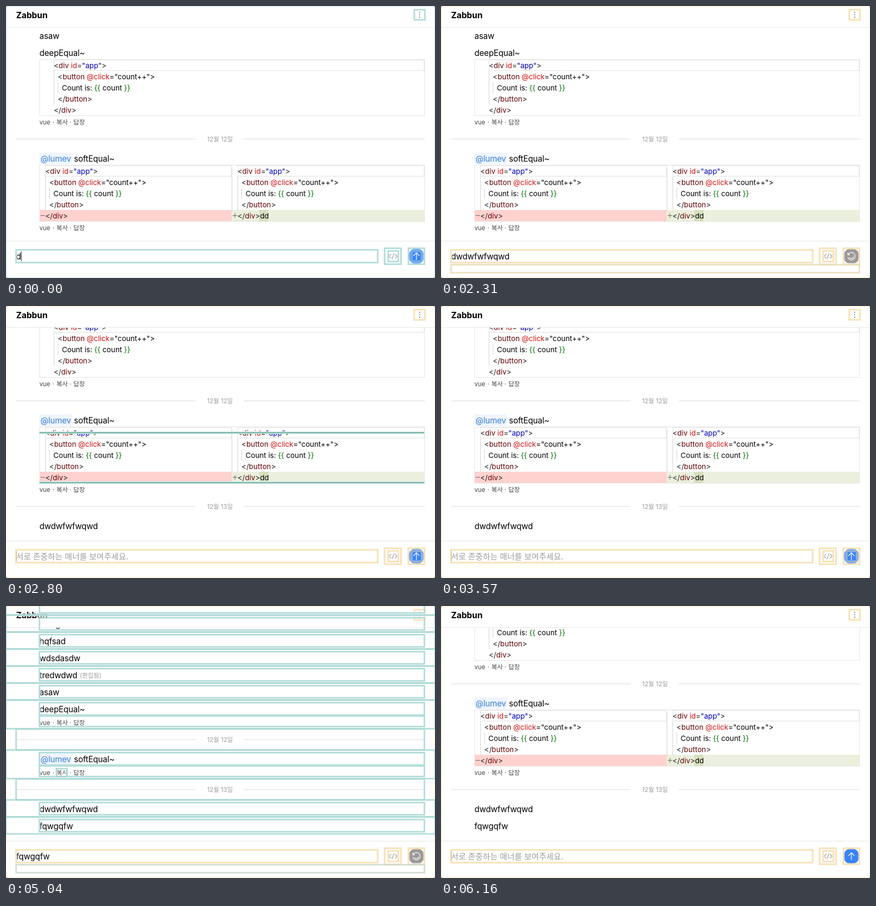
An HTML page for the animation above (6510 ms loop, 808 px wide and 512 px high).

```html
<!DOCTYPE html>
<html lang="ko">
<head>
<meta charset="utf-8">
<title>Chat</title>
<style>
html, body { margin: 0; width: 100%; height: 100%; overflow: hidden; background: #666; }
svg { display: block; width: 808px; height: 512px; }
text {
  font-family: Inter, "Noto Sans CJK KR", "Noto Sans CJK", sans-serif;
  font-feature-settings: "calt" 0;
  white-space: pre;
}
.body { font-size: 15.4px; letter-spacing: -.15px; }
.code { font-size: 13.7px; }
.small { font-size: 11.7px; }
.hint { font-size: 15.1px; }
.title { font-size: 15.8px; font-weight: 700; }
</style>
</head>
<body>
<svg id="stage" viewBox="0 0 808 512"></svg>
<script>
const LOOP = 6510;
const HEAT = ['#37afa9', '#63b19e', '#80b393', '#97b488', '#abb67d',
  '#beb771', '#cfb965', '#dfba57', '#efbb49', '#febc38'];
const INK = '#000', MUTED = '#9c9c9c', LINE = '#e5e5e5';
const PUNC = '#222', TAG = '#640000', ATTR = '#d01010', VAL = '#0000b0', MUST = '#006e00';

const stage = document.getElementById('stage');

function el(parent, name, attrs = {}) {
  const node = document.createElementNS('http://www.w3.org/2000/svg', name);
  for (const k in attrs) node.setAttribute(k, attrs[k]);
  parent.appendChild(node);
  return node;
}
const group = (parent, attrs) => el(parent, 'g', attrs);
const rect = (parent, x, y, width, height, attrs) =>
  el(parent, 'rect', { x, y, width, height, ...attrs });
const path = (parent, d, stroke, width = 1) =>
  el(parent, 'path', { d, stroke, 'stroke-width': width, fill: 'none' });
const show = (node, on) => node.setAttribute('visibility', on ? 'visible' : 'hidden');

// parts: a string, or [text, colour] pairs
function label(parent, x, y, parts, cls = 'body', fill = INK, attrs = {}) {
  const node = el(parent, 'text', { x, y, class: cls, fill, ...attrs });
  if (typeof parts === 'string') node.textContent = parts;
  else for (const [s, c] of parts) el(node, 'tspan', { fill: c }).textContent = s;
  return node;
}

// Outline with a pale halo; its colour is inherited from the group's stroke
function outline(parent, x, y, w, h) {
  const box = [x + 1, y + 1, w - 2, h - 2];
  rect(parent, ...box, { fill: 'none', stroke: '#f2f4f4', 'stroke-width': 4.5, 'stroke-opacity': .7 });
  rect(parent, ...box, { fill: 'none', 'stroke-width': 2.4, 'stroke-opacity': .4 });
}

// ---- code blocks ----
const CODE = [
  [0, [['<', PUNC], ['div', TAG], [' id', ATTR], ['=', PUNC], ['"app"', VAL], ['>', PUNC]]],
  [1, [['<', PUNC], ['button', TAG], [' @click', ATTR], ['="count++">', INK]]],
  [2, [['Count is: ', INK], ['{{', MUST], [' count ', INK], ['}}', MUST]]],
  [1, [['</', PUNC], ['button', TAG], ['>', PUNC]]],
  [0, [['</', PUNC], ['div', TAG], ['>', PUNC]]]
];

function codeLines(g, x, right, top, tail = '') {
  rect(g, x + .5, top + 1.5, right - x - 1, 20, { fill: 'none', stroke: '#e8e8e8', 'stroke-width': 1.5 });
  path(g, `M${x + .5} ${top + 22}v63M${x + 8} ${top + 43}v21`, '#d3d3d3');
  CODE.forEach(([depth, parts], i) => {
    const extra = tail && i === 4 ? [[tail, INK]] : [];
    label(g, x + depth * 7.6, top + 16.6 + i * 21, parts.concat(extra), 'code');
  });
}

const frame = (g, top) =>
  rect(g, 63.5, top + .5, 725, 106, { fill: 'none', stroke: LINE });

function singleEditor(g, top) {
  frame(g, top);
  codeLines(g, 90, 788, top);
}

function diffEditor(g, top) {
  frame(g, top);
  rect(g, 63, top + 85, 362.5, 21, { fill: '#ffd2d0' });
  rect(g, 425.5, top + 85, 363, 21, { fill: '#ebefdd' });
  rect(g, 477, top + 85, 17, 21, { fill: '#d7dfbd' });
  path(g, `M425.5 ${top + 5}v80`, '#dedede', 1.5);
  codeLines(g, 74, 425, top);
  codeLines(g, 436, 788, top, 'dd');
  path(g, `M65 ${top + 95.5}h8.5M427 ${top + 95.5}h8.5M431.2 ${top + 91.2}v8.6`, '#666');
}

// ---- message list ----
const ROWS = [
  { text: 'sdwaf' }, { text: 'wdag' }, { text: 'hqfsad' }, { text: 'wdsdasdw' },
  { text: 'tredwdwd', edited: true }, { text: 'asaw' },
  { text: 'deepEqual~', editor: singleEditor },
  { date: '12월 12일' },
  { text: 'softEqual~', mention: '@lumev', editor: diffEditor },
  { date: '12월 13일' },
  { text: 'dwdwfwfwqwd' }, { text: 'fqwgqfw' }
];

function drawRow(g, marks, row, top, h, open) {
  const mid = top + 17, end = top + h;
  if (row.date) {
    path(g, `M19 ${top + 20.5}H357M448 ${top + 20.5}H789`, LINE, 1.3);
    label(g, 403, top + 24.5, row.date, 'small', MUTED, { 'text-anchor': 'middle' });
    outline(marks, 18, top, 771, 41);
    return;
  }
  if (row.mention) {
    rect(g, 63, mid - 11, 61, 22, { rx: 3, fill: '#eef5fd' });
    label(g, 65, mid + 5.5, row.mention, 'body', '#3b7ed0');
  }
  label(g, row.mention ? 128 : 63, mid + 5.5, row.text);
  if (row.edited) label(g, 139, mid + 5, '(편집됨)', 'small', MUTED);
  outline(marks, -1, top - 1, 810, h + 2);
  outline(marks, 62, top + 4, 727, 25);
  if (!row.editor) return;
  if (open) row.editor(g, top + 29);
  [[63, 'vue'], [87.5, '·'], [95, '복사'], [119.5, '·'], [127, '답장']].forEach(([x, s]) =>
    label(g, x, end - 6.8, s, 'small', '#444'));
  outline(marks, 62, top + 29, 727, 22);
  if (row.mention) outline(marks, 94, end - 20, 22, 17);
}

// Rows stack upwards from the bottom edge of the list
function buildList(parent, markParent, last, open) {
  const g = group(parent), marks = group(markParent, { stroke: HEAT[0] });
  for (let i = last, y = 429; i >= 0 && y > 0; i--) {
    const row = ROWS[i];
    const h = row.date ? 40 : row.editor ? (open ? 159 : 54) : 32;
    y -= h;
    drawRow(g, marks, row, y, h, open);
  }
  if (open) marks.remove();
  return { g, marks };
}

// ---- window ----
rect(stage, 0, 0, 808, 512, { rx: 3, fill: '#fff' });
const clip = el(el(stage, 'defs'), 'clipPath', { id: 'list' });
rect(clip, 0, 41, 808, 401);
const listLayer = group(stage, { 'clip-path': 'url(#list)' });

path(stage, 'M0 40.5H808M0 442.5H808', '#e8e8e8');
label(stage, 19, 22.6, 'Zabbun', 'title');
for (const y of [11.8, 16.5, 21.2]) el(stage, 'circle', { cx: 779, cy: y, r: 1.1, fill: '#777' });

const typed = label(stage, 19, 476.6, '');
const hint = label(stage, 19, 476.6, '서로 존중하는 매너를 보여주세요.', 'hint', MUTED);
const caret = rect(stage, 19, 461.5, 1, 19, { fill: '#111' });

path(stage, 'M725.5 467l-4.5 4 4.5 4M732.5 467l4.5 4-4.5 4M730.7 465.5l-3.4 11', '#9a9a9a', 1.1);

const disc = el(stage, 'circle', { cx: 773, cy: 471, r: 15 });
const discMark = group(stage);
outline(discMark, 762.5, 460, 22, 22);
discMark.setAttribute('opacity', .6);
const arrow = path(stage, 'M773 478V465M767.3 470.2L773 464.5L778.7 470.2', '#fff', 1.3);
const spinner = path(stage,
  'M767 467.5A7 7 0 1 1 766.3 473M766.3 464.5V468.3H770M769.5 473.5A4 4 0 0 0 776.8 472', '#fff', 1.2);

// ---- highlights ----
const marks = group(stage);
[[768, 6, 22, 21], [18, 458, 683, 26], [712, 455, 33, 32], [719, 460, 21, 22], [757, 455, 32, 32]]
  .forEach(b => outline(marks, ...b));
rect(marks, .5, .5, 807, 511, { rx: 3, fill: 'none', 'stroke-opacity': .3 });
const footMark = group(stage);
outline(footMark, 18, 486, 771, 17);

const rowMarks = group(stage);
const scenes = [[0, 8, true], [2520, 10, false], [2800, 10, true], [5040, 11, false], [5320, 11, true]]
  .map(([at, last, open]) => ({ at, ...buildList(listLayer, rowMarks, last, open) }));

// Bars across the diff editor just after it mounts
function bars(top) {
  const g = group(stage);
  for (const y of [top + 11.5, top + 105.5]) {
    path(g, `M62 ${y}H789`, '#e9f2ef', 5);
    path(g, `M63 ${y}H788`, '#74b6aa', 2.5);
  }
  return g;
}
const mounts = [[2800, bars(227)], [5320, bars(195)]];

// ---- timeline ----
const WORDS = [
  { text: 'dwdwfwfwqwd', keys: [0, 70, 210, 350, 420, 630, 840, 910, 1050, 1190, 1260],
    caretOff: 1820, send: 2100, fade: 210, clear: 2590, done: 2800, settle: 2800 },
  { text: 'fqwgqfw', keys: [3920, 4060, 4200, 4340, 4480, 4550, 4690],
    caretOff: 4830, send: 4830, fade: 70, clear: 5110, done: 5180, settle: 5320 }
];
const BLINKS = [[2590, 3080], [3570, 3920], [5110, 5600], [6160, LOOP]];
const BLUE = [59, 130, 246], GRAY = [156, 154, 152];

function render(t) {
  const w = WORDS[t < 3920 ? 0 : 1];
  const n = w.keys.filter(k => k <= t).length;
  const typing = t < w.clear, busy = t >= w.send && t < w.done;

  typed.textContent = typing ? w.text.slice(0, n) : '';
  show(hint, !typing);
  show(caret, typing ? t < w.caretOff : BLINKS.some(([a, b]) => t >= a && t < b));
  caret.setAttribute('x', typing ? 19 + typed.getComputedTextLength() : 19);

  const k = busy ? Math.min(1, (t - w.send + 70) / w.fade) : 0;
  disc.setAttribute('fill', `rgb(${BLUE.map((c, i) => Math.round(c + (GRAY[i] - c) * k))})`);
  show(arrow, !busy);
  show(spinner, busy);
  show(discMark, !busy && t < 5950);

  const heat = t >= w.send ? 9 : Math.min(9, n - 1);
  marks.setAttribute('stroke', HEAT[heat]);
  discMark.setAttribute('stroke', HEAT[heat]);
  show(footMark, n >= 4 && t < w.settle);
  footMark.setAttribute('stroke', HEAT[Math.max(0, n - 4)]);

  scenes.forEach((s, i) => {
    const on = t >= s.at && (i === scenes.length - 1 || t < scenes[i + 1].at);
    show(s.g, on);
    show(s.marks, on);
  });
  for (const [at, g] of mounts) show(g, t >= at && t < at + 140);
}

const start = performance.now();
function tick() {
  render((performance.now() - start) % LOOP);
  requestAnimationFrame(tick);
}
tick();
</script>
</body>
</html>
```
